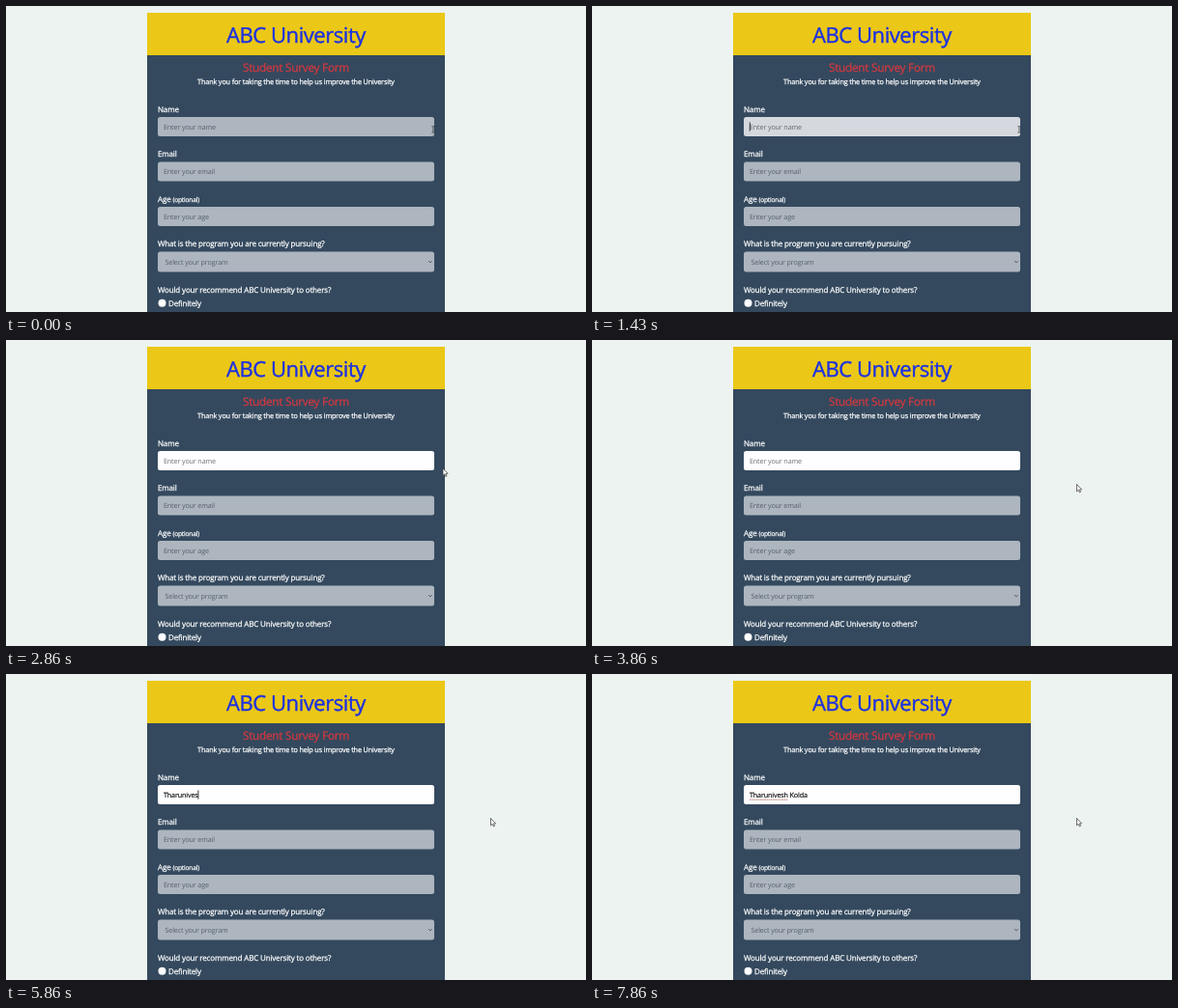
Animation, 600 px wide and 317 px high, one loop 8000 ms. Source, as an HTML page:

```html
<!DOCTYPE html>
<html lang="en">
<head>
<meta charset="utf-8">
<title>Student survey form</title>
<style>
  html, body { margin: 0; height: 100%; overflow: hidden; background: #edf3f0; }
  svg { display: block; width: 600px; height: 317px; }
  text { font: 8px "Open Sans", "Noto Sans", sans-serif; letter-spacing: -.02em; white-space: pre;
         text-rendering: geometricPrecision; }
  .middle { text-anchor: middle; }
  .title { font-size: 22px; fill: #1c31e2; stroke: #1c31e2; stroke-width: .4; }
  .subtitle { font-size: 11.75px; fill: #d5383f; stroke: #d5383f; stroke-width: .25; }
  .label { fill: #fff; stroke: #fff; stroke-width: .25; }
  .intro { font-size: 7.25px; }
  .small { font-size: 6.6px; }
  .field { opacity: .6; }
  .field rect { fill: #fefdff; }
  .field text { font-size: 7.2px; fill: #6c7075; }
  .field .typed { fill: #000; stroke: #000; stroke-width: .12; }
</style>
</head>
<body>
<svg viewBox="0 0 600 317">
  <rect x="146" y="7" width="308" height="310" fill="#34495e"/>
  <rect x="146" y="7" width="308" height="44" fill="#ebc817"/>
  <text class="title middle" x="300" y="38">ABC University</text>
  <text class="subtitle middle" x="300" y="67.5">Student Survey Form</text>
  <text class="label intro middle" x="300" y="81">Thank you for taking the time to help us improve the University</text>

  <text class="label" x="157" y="109.5">Name</text>
  <text class="label" x="157" y="156">Email</text>
  <text class="label" x="157" y="202.5">Age <tspan class="small">(optional)</tspan></text>
  <text class="label" x="157" y="249">What is the program you are currently pursuing?</text>
  <text class="label" x="157" y="296.5">Would your recommend ABC University to others?</text>
  <circle cx="161.5" cy="307.7" r="4" fill="#fff"/>
  <text class="label" x="168" y="311">Definitely</text>

  <g class="field" id="nameField">
    <rect x="157" y="115" width="286" height="20" rx="2.5"/>
    <text id="placeholder" x="163" y="127.8">Enter your name</text>
    <text id="typed" class="typed" x="163" y="127.8"></text>
    <path id="spelling" fill="none" stroke="#b5705c" stroke-width=".9" stroke-dasharray="1.6 .6"/>
    <path id="caret" d="M.3 120.5v9.2" stroke="#000" stroke-width=".8"/>
  </g>
  <g class="field">
    <rect x="157" y="161.5" width="286" height="20" rx="2.5"/>
    <text x="163" y="174.3">Enter your email</text>
  </g>
  <g class="field">
    <rect x="157" y="208" width="286" height="20" rx="2.5"/>
    <text x="163" y="220.8">Enter your age</text>
  </g>
  <g class="field">
    <rect x="157" y="254.5" width="286" height="21" rx="2.5"/>
    <text x="164.5" y="267.8">Select your program</text>
    <path d="M437.2 264.2l1.7 1.7 1.7-1.7" fill="none" stroke="#333" stroke-width=".8"/>
  </g>

  <path id="beam" d="M440.4 124.7h1l.6.5.6-.5h1M442 125.2v5.4M440.4 131.1h1l.6-.5.6.5h1" fill="none" stroke="#222" stroke-width=".7"/>
  <path id="arrow" d="M0 0v7.4l1.7-1.5 1.1 2.5 1.2-.5-1.1-2.5h2.2z" fill="#fff" stroke="#333" stroke-width=".7"/>
</svg>
<script>
  const LOOP = 8000, FPS = 7;
  const CLICK = 9, MOVE = 20, TYPING = 28, LAST_KEY = 51;
  const NAME = 'Tharunivesh Kolda';
  const FIRST_WORD = NAME.indexOf(' ');
  const MOVE_PATH = [[452, 133], [476, 142], [498, 150], [505, 152], [501.5, 149.5]];

  const el = id => document.getElementById(id);
  const nameField = el('nameField'), placeholder = el('placeholder'), typed = el('typed');
  const spelling = el('spelling'), caret = el('caret'), beam = el('beam'), arrow = el('arrow');
  const show = (node, visible) => node.setAttribute('visibility', visible ? 'visible' : 'hidden');
  const clamp = (v, lo, hi) => Math.min(hi, Math.max(lo, v));

  function draw(ms) {
    const step = Math.floor(ms * FPS / 1000 + .03);
    const count = step < TYPING ? 0 : Math.min(NAME.length, Math.floor((step - 26) / 1.46));

    nameField.style.opacity = .6 + .4 * clamp((step - CLICK) / 2, 0, 1);
    typed.textContent = NAME.slice(0, count);
    show(placeholder, !count);

    const blinkOn = start => (step - start) % 7 < 4;
    const caretOn = step < CLICK ? false
      : step < TYPING ? blinkOn(CLICK)
      : step < LAST_KEY || blinkOn(LAST_KEY);
    show(caret, caretOn);
    caret.setAttribute('transform', `translate(${163 + (count ? typed.getComputedTextLength() : 0)})`);

    const misspelt = count > FIRST_WORD;
    show(spelling, misspelt);
    if (misspelt) spelling.setAttribute('d', `M163 130.2h${typed.getSubStringLength(0, FIRST_WORD)}`);

    const moving = step >= MOVE;
    show(beam, !moving);
    show(arrow, moving);
    arrow.setAttribute('transform', `translate(${MOVE_PATH[clamp(step - MOVE, 0, MOVE_PATH.length - 1)]})`);
  }

  function tick() {
    draw(performance.now() % LOOP);
    requestAnimationFrame(tick);
  }
  tick();
</script>
</body>
</html>
```
